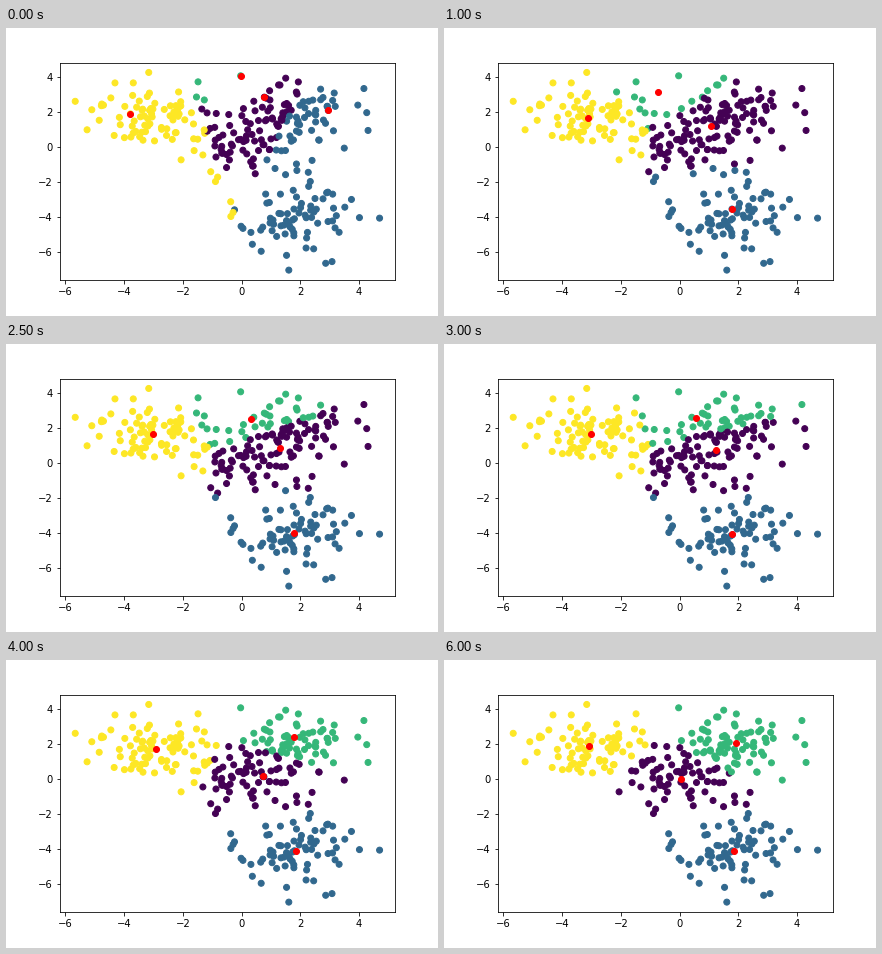
A matplotlib script that plays this animation: 432x288 px, repeating every 6500 ms.

```python
import numpy as np
import matplotlib.pyplot as plt
from matplotlib.animation import FuncAnimation

STEPS = 13
BLOBS = [(0, 0), (2, 2), (-3, 2), (2, -4)]
# Rough seeds, one per cluster; each snaps to the nearest data point.
SEEDS = [(0.76, 2.84), (2.95, 2.1), (-0.03, 4.05), (-3.8, 1.87)]


def make_points(per_blob=75):
    rng = np.random.RandomState(0)
    pts = np.vstack([rng.normal(c, 1.0, (per_blob, 2)) for c in BLOBS])
    order = np.arange(len(pts))
    rng.shuffle(order)
    return pts[order]


def distances(a, b):
    return np.linalg.norm(a[:, None] - b[None], axis=2)


def lloyd(pts, centers):
    """Return (centers, labels) for every step of k-means."""
    history = []
    for _ in range(STEPS):
        labels = distances(pts, centers).argmin(axis=1)
        history.append((centers, labels))
        centers = np.array([pts[labels == k].mean(axis=0)
                            for k in range(len(centers))])
    return history


points = make_points()
start = points[distances(np.array(SEEDS), points).argmin(axis=1)]
history = lloyd(points, start)

fig = plt.figure(figsize=(6, 4), dpi=72, facecolor="white")
fig.subplots_adjust(left=0.125, right=0.9, bottom=0.125, top=0.88)
ax = fig.add_subplot()
dots = ax.scatter(points[:, 0], points[:, 1], c=history[0][1],
                  cmap="viridis", vmin=0, vmax=3)
means = ax.scatter(start[:, 0], start[:, 1], c="r")

# Freeze the view so it stays put while the means move.
ax.set_xlim(ax.get_xlim())
ax.set_ylim(ax.get_ylim())


def draw(step):
    centers, labels = history[step]
    dots.set_array(labels)
    means.set_offsets(centers)
    return dots, means


anim = FuncAnimation(fig, draw, frames=STEPS, interval=500, repeat=True,
                     repeat_delay=0)
plt.show()
```
